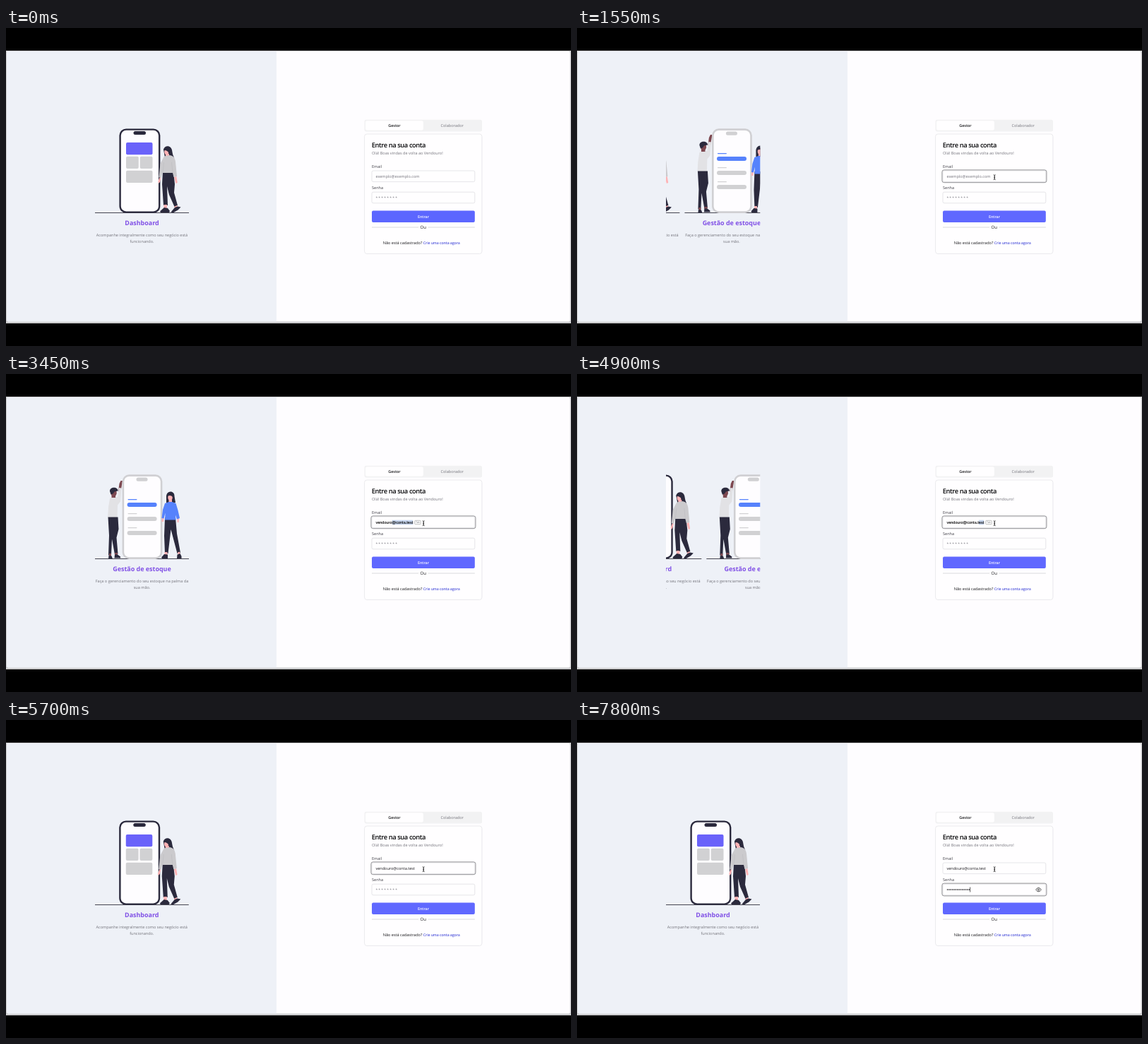
Animation of 800 by 450 pixels, one loop 8000 ms. Source, as an HTML page:

```html
<!DOCTYPE html>
<html lang="pt-BR">
<head>
<meta charset="utf-8">
<title>Entrar</title>
<style>
  html, body { margin: 0; width: 100%; height: 100%; overflow: hidden; background: #000; }
  svg { display: block; width: 100vw; height: 100vh; }
  text { font: 5.55px "Open Sans", "Noto Sans", sans-serif; text-rendering: geometricPrecision; fill: #3f3f46; }
  .mid { text-anchor: middle; }
  .semi { font-weight: 600; }
  .muted { fill: #74747c; }
  .ink { fill: #18181b; }
  .title { font-size: 9.3px; font-weight: 600; letter-spacing: -.4px; fill: #09090b; }
  .heading { font-size: 8.95px; font-weight: 700; fill: #8050e6; }
  .field { fill: #fffeff; stroke: #dcdce0; stroke-width: .7; }
  .ring { fill: none; stroke: #858588; stroke-width: .9; }
  .dark { fill: #2b2a3d; }
  .skin { fill: #ffb3b5; }
  .brown { fill: #7d4850; }
  .gray { fill: #d1d1d3; }
  .blue { fill: #5682fc; }
  .ground { stroke: #35343f; stroke-width: .9; }
  #preview { font-family: "Liberation Sans", Arial, sans-serif; font-size: 5.56px; fill: #111; stroke: #111; stroke-width: .12; }
</style>
</head>
<body>
<svg viewBox="0 0 800 450">
  <defs>
    <clipPath id="window"><rect x="126" y="140" width="133.3" height="170"/></clipPath>
  </defs>
  <rect width="800" height="450"/>
  <rect y="32" width="800" height="386" fill="#cbcbcd"/>
  <rect x="1.3" y="33" width="797.4" height="382.6" rx="2" fill="#fefdff"/>
  <path d="M383 33H1.3V413.6a2 2 0 0 0 2 2H383Z" fill="#eef1f7"/>

  <g clip-path="url(#window)">
    <g id="track">
      <g id="dashboard">
        <path class="ground" d="M126 261.5H259"/>
        <rect x="161.6" y="143.6" width="55.6" height="117" rx="8.5" fill="#fefdff" stroke="#2b2a3d" stroke-width="2.4"/>
        <rect class="dark" x="180.5" y="146" width="17.5" height="5" rx="2.5"/>
        <rect x="170" y="162" width="37.5" height="17.3" rx="2" fill="#6a62fa"/>
        <rect class="gray" x="170" y="181.7" width="17.8" height="17.3" rx="2"/>
        <rect class="gray" x="189.7" y="181.7" width="17.8" height="17.3" rx="2"/>
        <rect class="gray" x="170" y="201.7" width="37.5" height="17.3" rx="2"/>
        <path class="dark" d="M223 172c1-5 7-6 10-3 3 3 2 8 4 12 2 4 0 8-4 8l-8-6Z"/>
        <ellipse class="skin" cx="227.3" cy="175.3" rx="3" ry="4"/>
        <path class="dark" d="M223 173c1-4 6-6 9-3l-1 8c-1-3-3-5-8-5Z"/>
        <path class="skin" d="M226 178h5v5h-5ZM217.8 211l-2.5 6 .6 3 2-2 1.6-6ZM238 211l2.5 9 2.3-1-1.5-9Z"/>
        <path class="dark" d="M222 203h15l2 18-1 12 5 18-4 3-8-18-3-12 1 27h-6l-2-30Z"/>
        <path class="skin" d="M223.5 250h4.5v5h-4.5ZM238 253l4-2 1.5 4-3.5 1Z"/>
        <path class="dark" d="M224 254l5 1 3 4-1 2h-12l-1-1.5ZM239 254l4-1.5 4.5 1-4 4-7 4-3-1Z"/>
        <path d="M224 181.5l8-1.5c5 1 7 3 8 9l2 21-4.5 1-1.5-6h-14.500l-2 7-3-1 2-19Z" fill="#cbcacd"/>
        <path d="M222 205l1.500-15M236 205l-1.500-15" fill="none" stroke="#b9b8bc" stroke-width=".5"/>
        <text class="heading mid" x="192.500" y="279">Dashboard</text>
        <text class="muted mid" x="192.500" y="295">Acompanhe integralmente como seu negócio está</text>
        <text class="muted mid" x="192.500" y="304">funcionando.</text>
      </g>
      <g id="stock" transform="translate(140)">
        <path class="ground" d="M126 261.500H259"/>
        <path class="brown" d="M159 166l1.500-11 2-4 2.500 0-1 6-2 12Z"/>
        <path d="M147 176l6-3 5 1 2-13 3.500.500-1.500 19-4 5-.5 18h-13.500l1-15Z" fill="#e2e2e5"/>
        <path class="dark" d="M144.500 202.500h14l1 17-3 12 2 23-4.500 1-4-22-1 23h-4l1-28Z"/>
        <path class="brown" d="M146 254h3v5h-3ZM154 253h4v4h-4ZM149.500 171h5.500v4h-5.500Z"/>
        <path class="dark" d="M145.500 257l4 .500 1.500 4h-6ZM154 255.500l4 0 4 3v2h-8.500Z"/>
        <ellipse class="brown" cx="152.600" cy="168.300" rx="4.100" ry="5.300"/>
        <path class="dark" d="M147 166c-.500-7 12-7 11.500-.5l-5 1-2 3-3 1Z"/>
        <rect x="165.900" y="143.600" width="54.200" height="117" rx="8.500" fill="#fefdff" stroke="#d0d0d3" stroke-width="2.600"/>
        <rect class="gray" x="184.500" y="146.500" width="16" height="5.200" rx="2.500"/>
        <rect class="blue" x="172.500" y="177" width="13" height="1.200" rx=".6"/>
        <rect class="blue" x="171.600" y="182" width="42" height="6" rx="3"/>
        <rect class="gray" x="172.500" y="197" width="13" height="1.200" rx=".6"/>
        <rect class="gray" x="171.600" y="202" width="42" height="6" rx="3"/>
        <rect class="gray" x="172.500" y="217" width="13" height="1.200" rx=".6"/>
        <rect class="gray" x="171.600" y="222" width="42" height="6" rx="3"/>
        <path class="dark" d="M227 175c-1-11 12-11 11.500-2l1.500 9h-13Z"/>
        <ellipse class="skin" cx="232.500" cy="174.500" rx="3.200" ry="4.300"/>
        <path class="dark" d="M228.500 173c1-4 6-5 8.500-1l-1 2c-2-2-4-3-7.500-1Z"/>
        <path class="skin" d="M230.500 178h4.500v5h-4.500ZM221 203h2.500l-.500 6h-2.500ZM242.500 203h2.500l-.500 7h-2Z"/>
        <path class="dark" d="M225 203h15l2 23 5 27-4.500 1-9-34-4 34h-4.500l-1-25Z"/>
        <path class="skin" d="M224.500 252h4v4h-4ZM243 252.500l3-1 1 4-3 1Z"/>
        <path class="dark" d="M224 255l5 .5v5.500h-8l-1-1.500ZM242.500 255.500l4-1.500 2 4v3h-6.500Z"/>
        <path class="blue" d="M225 183l5.500-2h5l5 2 3 10 2.500 11-4 1.500-2-6 .5 7h-15.500l.500-10-2 8-3-.5 1.500-12Z"/>
        <text class="heading mid" x="192.500" y="279">Gestão de estoque</text>
        <text class="muted mid" x="192.500" y="295">Faça o gerenciamento do seu estoque na palma da</text>
        <text class="muted mid" x="192.500" y="304">sua mão.</text>
      </g>
    </g>
  </g>

  <rect x="507.500" y="129.800" width="166.500" height="16.700" rx="2.500" fill="#f2f2f3"/>
  <rect x="509" y="131.300" width="81.800" height="13.500" rx="2" fill="#fffeff"/>
  <text class="mid semi ink" x="550" y="140" style="font-size:5.400px">Gestor</text>
  <text class="mid muted" x="631.700" y="140">Colaborador</text>

  <rect x="507.600" y="150" width="166.300" height="169.500" rx="3.500" fill="#fffeff" stroke="#e5e5e9" stroke-width=".8"/>
  <text class="title" x="517.800" y="169">Entre na sua conta</text>
  <text class="muted" x="518" y="179">Olá! Boas vindas de volta ao Vendouro!</text>

  <text x="518" y="197.600">Email</text>
  <rect class="field" x="518" y="202" width="145.800" height="15.600" rx="2"/>
  <rect class="ring" id="emailRing" x="516.900" y="200.900" width="148" height="17.800" rx="2.800"/>
  <text class="muted" id="emailHint" x="523.400" y="211.800">exemplo@exemplo.com</text>
  <g id="suggestion">
    <rect id="selection" y="206.700" height="6.500" fill="#c6d5ee"/>
    <text id="preview" x="523.400" y="211.800"></text>
    <rect x="578.700" y="207.300" width="8.400" height="5.400" rx="1" fill="#fff" stroke="#999" stroke-width=".6"/>
    <text class="mid muted" x="582.900" y="211.300" style="font-size:3.500px">Tab</text>
  </g>
  <text class="ink" id="email" x="523.400" y="211.800"></text>

  <text x="518" y="228">Senha</text>
  <rect class="field" x="518" y="232.200" width="145.800" height="15.600" rx="2"/>
  <rect class="ring" id="passwordRing" x="516.900" y="231.100" width="148" height="17.800" rx="2.800"/>
  <text class="muted" id="passwordHint" x="523.400" y="242" style="font-size:4.900px">* * * * * * * *</text>
  <path id="dots" fill="none" stroke="#18181b" stroke-width="1.700" stroke-linecap="round"/>
  <g id="eye" fill="none" stroke="#222" stroke-width=".8">
    <path d="M649.700 240.300q3.800-6 7.600 0q-3.800 5-7.600 0Z"/>
    <circle cx="653.500" cy="240.200" r="1.100"/>
  </g>
  <path id="caret" stroke="#111" stroke-width=".7"/>

  <rect id="button" x="518" y="258.400" width="145.800" height="16.500" rx="2"/>
  <text class="mid semi" x="591" y="268.800" style="font-size:5.300px;fill:#fff">Entrar</text>
  <path d="M518 282H584M597.500 282H663.800" stroke="#d0d0d4" stroke-width=".8"/>
  <text class="mid ink" x="590.800" y="284.200" style="font-size:6px">Ou</text>
  <text class="ink" x="533.800" y="305.900">Não está cadastrado?</text>
  <text class="semi" x="590.800" y="305.900" style="font-size:5.300px;letter-spacing:-.14px;fill:#5358dc">Crie uma conta agora</text>

  <path id="pointer" d="M589.700 207.700q1.500 0 1.500 1v5q0 1-1.500 1M592.700 207.700q-1.500 0-1.500 1v5q0 1 1.500 1M590.400 211.800h1.600" fill="none" stroke="#222" stroke-width=".7"/>
</svg>
<script>
  const $ = id => document.getElementById(id);
  const LOOP = 8000, SLIDE = 140, TEXT_X = 523.4, DOT_STEP = 2.36;
  const EMAIL = 'vendouro@conta.test';
  const EMAIL_FOCUS = 1000, PASSWORD_FOCUS = 6300;
  const emailKeys = [1700, 2150, 2400, 2600, 2850, 3050, 3250, 3450, 3700,
    3950, 4050, 4150, 4250, 4350, 4550, 4750, 4950, 5050, 5200];
  const passwordKeys = [6400, 6450, 6550, 6750, 6850, 6950, 7050, 7200,
    7350, 7450, 7500, 7650, 7700, 7800];

  $('preview').textContent = $('email').textContent = EMAIL;

  const show = (id, on) => $(id).style.display = on ? '' : 'none';
  const typed = (keys, t) => keys.filter(k => k <= t).length;

  // Carousel spring: remaining fraction, stepped at 60 Hz.
  function remaining(ms) {
    if (ms <= 0) return 1;
    const n = ms * 0.06;
    return 1.853 * 0.8805 ** n - 0.853 * 0.7723 ** n;
  }

  function drawEmail(t, count) {
    const complete = count === EMAIL.length;
    show('emailRing', t >= EMAIL_FOCUS && t < PASSWORD_FOCUS);
    show('emailHint', !count);
    show('suggestion', count && !complete);
    show('email', complete);
    if (count && !complete) {
      const preview = $('preview');
      const start = preview.getSubStringLength(0, count);
      $('selection').setAttribute('x', TEXT_X + start);
      $('selection').setAttribute('width', preview.getComputedTextLength() - start);
    }
  }

  function drawPassword(t, count) {
    show('passwordRing', t >= PASSWORD_FOCUS);
    show('passwordHint', !count);
    show('eye', count);
    let d = '';
    for (let i = 0; i < count; i++) d += `M${TEXT_X + 1.2 + i * DOT_STEP} 240h.01`;
    $('dots').setAttribute('d', d);
  }

  function drawCaret(t, emailCount, dotCount) {
    const inPassword = t >= PASSWORD_FOCUS;
    const selecting = emailCount > 0 && emailCount < EMAIL.length;
    const lastKey = inPassword
      ? passwordKeys[dotCount - 1] ?? PASSWORD_FOCUS
      : emailKeys[emailCount - 1] ?? EMAIL_FOCUS;
    const lit = Math.floor((t - lastKey) / 500) % 2 === 0;
    show('caret', t >= EMAIL_FOCUS && !selecting && lit);
    const width = inPassword ? dotCount * DOT_STEP
      : emailCount ? $('email').getComputedTextLength() : 0;
    $('caret').setAttribute('d', `M${TEXT_X + width + .2} ${inPassword ? 236.5 : 206.3}v7`);
  }

  function draw(t) {
    const offset = t < 4776 ? 1 - remaining(t - 1258) : remaining(t - 4776);
    $('track').setAttribute('transform', `translate(${-SLIDE * offset})`);

    const fade = Math.min(1, Math.max(0, (t - 300) / 200));
    $('button').setAttribute('fill', `rgb(${92 + 4 * fade},${102 + 2 * fade},255)`);

    const emailCount = typed(emailKeys, t), dotCount = typed(passwordKeys, t);
    drawEmail(t, emailCount);
    drawPassword(t, dotCount);
    drawCaret(t, emailCount, dotCount);
    show('pointer', t >= EMAIL_FOCUS);
  }

  function tick() {
    draw(performance.now() % LOOP);
    requestAnimationFrame(tick);
  }
  tick();
</script>
</body>
</html>
```
